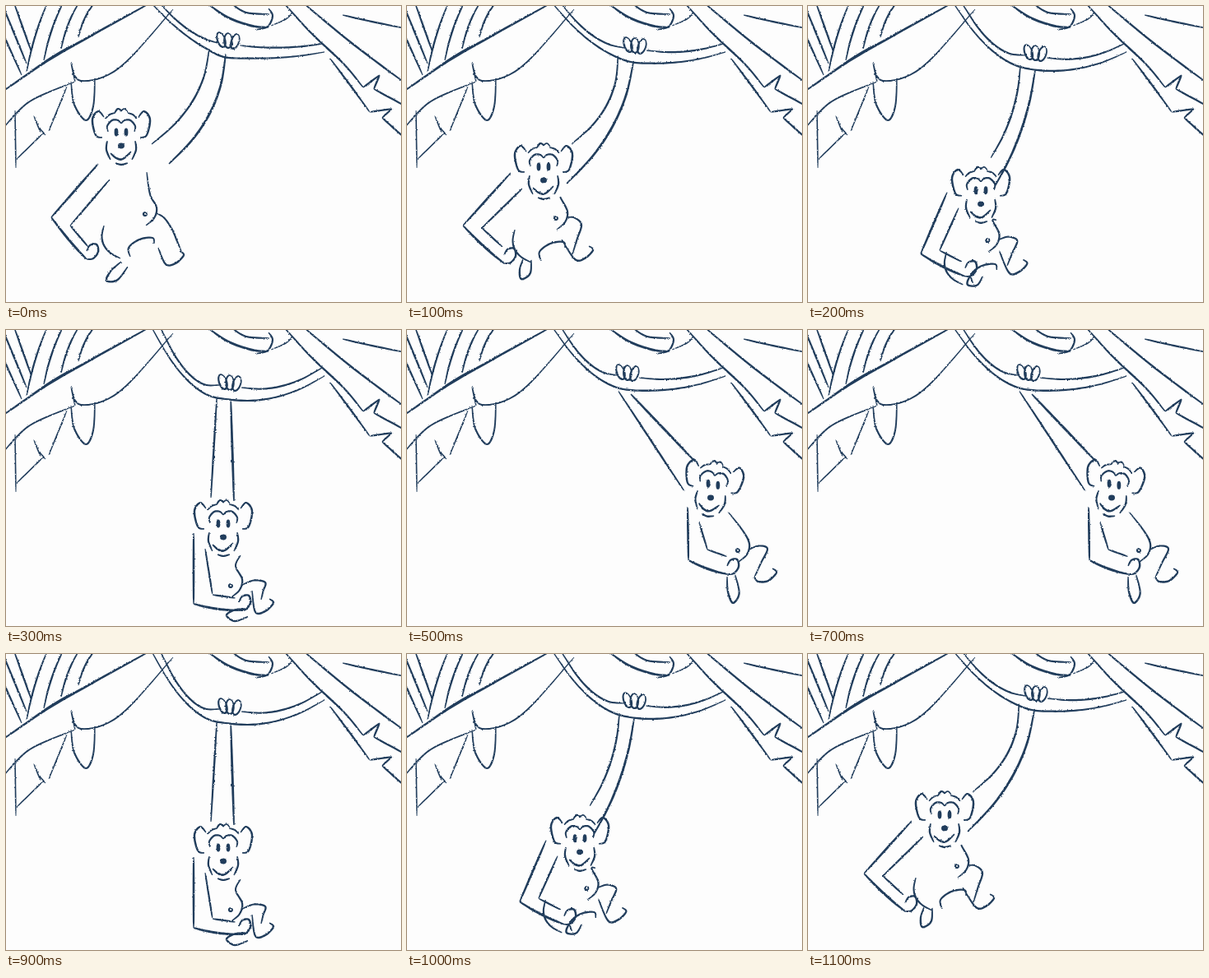
An HTML page that plays this animation: 480x360 px, repeating every 1.2 s.

```html
<!DOCTYPE html>
<html lang="en">
<head>
<meta charset="utf-8">
<title>Swinging monkey</title>
<style>
  html, body { margin: 0; width: 100%; height: 100%; overflow: hidden; background: #fdfdfd; }
  svg { display: block; width: 100vw; height: 100vh; }
</style>
</head>
<body>
<svg viewBox="0 0 480 360" fill="#213d5c">
  <filter id="chalk" filterUnits="userSpaceOnUse" x="0" y="0" width="480" height="360" color-interpolation-filters="sRGB">
    <feTurbulence type="fractalNoise" baseFrequency="0.6" numOctaves="2" seed="4"/>
    <feDisplacementMap in="SourceGraphic" scale="2.2" xChannelSelector="R" yChannelSelector="G"/>
  </filter>
  <g filter="url(#chalk)">
    <path id="jungle"/>
    <path id="monkey"/>
  </g>
</svg>
<script>
const STEP = 100;
const KEYS = [0, 1, 3, 5];
const PHASES = [0, 1, 2, 3, 4, 5, 5.6];   // the swing slows down at its right end

const points = text => text.trim().split(/\s+/).map(p => p.split(',').map(Number));
const add = (p, x, y) => [p[0] + x, p[1] + y];
const mix = (a, b, k) => [a[0] + (b[0] - a[0]) * k, a[1] + (b[1] - a[1]) * k];
const around = (origin, text) => points(text).map(p => add(origin, ...p));

// Points from a to b, bent away from the straight line by (dx, dy) in the middle.
const arc = (a, b, dx, dy) => [0, 0.25, 0.5, 0.75, 1].map(u => {
  const k = 4 * u * (1 - u);
  return add(mix(a, b, u), dx * k, dy * k);
});

// Catmull-Rom curve through the given points.
function spline(pts, n = 8) {
  const out = [];
  for (let i = 0; i < pts.length - 1; i++) {
    const p0 = pts[i - 1] || pts[i], p1 = pts[i], p2 = pts[i + 1], p3 = pts[i + 2] || p2;
    for (let j = 0; j < n; j++) {
      const t = j / n;
      out.push([0, 1].map(c => p1[c] + 0.5 * t * (p2[c] - p0[c] +
        t * (2 * p0[c] - 5 * p1[c] + 4 * p2[c] - p3[c] +
        t * (3 * (p1[c] - p2[c]) + p3[c] - p0[c])))));
    }
  }
  return [...out, pts[pts.length - 1]];
}

// Outline of a brush stroke that thins out at both ends.
function brush(pts, width = 2.3) {
  const line = spline(pts), last = line.length - 1;
  const left = [], right = [];
  line.forEach(([x, y], i) => {
    const a = line[Math.max(0, i - 1)], b = line[Math.min(last, i + 1)];
    const dx = b[0] - a[0], dy = b[1] - a[1], len = Math.hypot(dx, dy) || 1;
    const r = width / 2 * (0.45 + 0.55 * Math.sqrt(Math.abs(Math.sin(Math.PI * i / last))));
    left.push([x - dy / len * r, y + dx / len * r]);
    right.unshift([x + dy / len * r, y - dx / len * r]);
  });
  return 'M' + left.concat(right).map(p => p.map(v => v.toFixed(1)).join(' ')).join('L') + 'Z';
}

// Slash marks a sharp corner: the next curve starts where the last one ended.
function sketch(text, width) {
  let end = [];
  return text.split('/').map(part => {
    const pts = [...end, ...points(part)];
    end = pts.slice(-1);
    return brush(pts, width);
  }).join('');
}

const dot = ([x, y], rx, ry) =>
  `M${x - rx} ${y}a${rx} ${ry} 0 1 0 ${2 * rx} 0a${rx} ${ry} 0 1 0 ${-2 * rx} 0Z`;

function ring([x, y], rx, ry, lean) {
  const pts = [];
  for (let a = -1; a < 5.5; a += Math.PI / 4) {
    const v = ry * Math.sin(a);
    pts.push([x + rx * Math.cos(a) - v * lean, y + v]);
  }
  return brush(pts);
}

function drawJungle() {
  let d = '';
  for (let i = 0; i < 3; i++) d += brush([[15 * i - 20, -3], [19 + 6 * i, 84 - 14 * i]]);
  for (let i = 0; i < 4; i++) d += brush(arc([50 + 19 * i, -3], [25 + 21 * i, 80 - 14 * i], -2, -2));

  // Left leaf with its torn pieces.
  d += sketch('-4,104 50,67 100,38 176,-4', 2.8) + sketch('18,88 60,59 105,35', 1.3);
  d += sketch('-3,148 29,116 84,92 / 79,69 / 91,91 138,75 203,4', 1.9);
  d += sketch('79,92 83,120 97,139 106,122 108,88');
  d += sketch('11,127 12,197', 1.7) + sketch('13,186 45,155', 1.7);
  d += sketch('34,134 42,154', 1.7) + sketch('41,149 48,157', 1.7) + sketch('52,152 74,98', 1.7);

  // Right leaf.
  d += sketch('362,-3 420,45 484,93', 2.5) + sketch('409,11 440,18 484,27');
  d += sketch('338,-3 372,34 410,70 434,99 / 454,84 / 447,101 / 484,121', 2.4);
  d += sketch('394,64 418,96 442,129 / 469,125 / 457,136 / 484,160');

  // Coiled vine.
  d += sketch('246,-2 270,14 298,24 318,26', 2.9) + sketch('275,-2 292,8 320,10');
  return d + sketch('319,3 324,12 318,25 303,29') + sketch('322,24 340,16 348,8', 1.6);
}

// Each joint passes through four places during one swing.
const joints = {
  grip: '270,42 277,48 272,64 268,52',
  nose: '140,170 166,212 264,252 369,204',
  armBack: '177,168 200,168 249,204 337,196',
  armFront: '198,192 194,216 277,208 350,160',
  shoulder: '112,192 126,203 228,247 341,215',
  elbow: '55,257 68,267 228,333 342,280',
  wrist: '98,308 118,313 283,341 389,297',
  chest: '171,202 187,233 285,274 390,221',
  navel: '169,253 181,258 273,311 402,268',
  knee: '202,272 212,266 315,307 438,266',
  ankle: '213,298 201,302 310,328 422,301',
  calf: '185,294 188,284 299,317 422,301',
  toe: '206,313 216,307 315,342 439,305',
  heel: '140,311 141,308 291,339 389,300',
  sole: '122,334 139,332 268,347 396,332'
};
for (const name in joints) joints[name] = points(joints[name]);

// Smooth cubic path through the four places.
function locate(places, t) {
  return KEYS.reduce((sum, key, i) => {
    const weight = KEYS.reduce((w, k) => k === key ? w : w * (t - k) / (key - k), 1);
    return add(sum, places[i][0] * weight, places[i][1] * weight);
  }, [0, 0]);
}

function drawVine(grip) {
  const sag = (grip[1] - 30) / 2, under = add(grip, -5, 20);
  return brush(arc([188, -2], add(grip, -13, 3), 0, 1.3 * sag)) +
    brush(arc(add(grip, 14, 6), [384, 46], 0, 0.6 * sag)) +
    brush([...arc([177, -3], under, 0, 1.3 * sag), ...arc(under, [387, 56], 0, 0.7 * sag).slice(1)]) +
    [-1, 0, 1].map(k => ring(add(grip, 8.5 * k, k), 4.8, 9, 0.25 * k)).join('');
}

function drawHead(nose, tilt) {
  const c = Math.cos(tilt), s = Math.sin(tilt);
  const place = ([x, y]) => add(nose, x * c - y * s, x * s + y * c);
  const stroke = (text, width) => brush(points(text).map(place), width);
  let d = dot(nose, 4, 3.4);
  for (const side of [-1, 1]) {
    const mirror = pts => pts.map(([x, y]) => place([x * side, y]));
    d += brush(mirror(points('21,-35 28,-42 35,-32 31,-13 23,-10')), 2.5);
    d += brush(mirror(points('0,-27 4,-31 11,-31 17,-24 16,-17')));
    d += brush(mirror(points('7,-40 14,-38 19,-33')), 2);
    d += brush(mirror(points('17,-6 18,5 13,17')));
    d += dot(place([6 * side, -16.5]), 2.4, 5);
  }
  return d + stroke('-8,-40 -4,-45 1,-42') + stroke('-1,-42 4,-45 8,-41', 1.7) +
    stroke('-13,9 -6,15 2,16 12,7', 2.6) + stroke('-7,21 0,23 8,21');
}

function drawPose(t) {
  const j = {};
  for (const name in joints) j[name] = locate(joints[name], t);
  const { grip, shoulder, elbow, wrist, navel, knee, ankle, toe, heel, sole } = j;

  // Holding arm, curved while the body hangs back.
  const bow = 15 * Math.min(1, Math.max(0, (3 - t) / 2));
  let d = drawVine(grip) + drawHead(j.nose, Math.max(0, t - 3) * 0.09);
  d += brush(arc(add(grip, 2.4 * t - 23, 10 + 2.5 * t), j.armBack, bow, bow * 0.35), 2.4);
  d += brush(arc(add(grip, 1.4 * t - 3, 17 + 1.8 * t), j.armFront, bow, bow * 0.35), 2.9);

  // Free arm.
  const crook = add(elbow, 23, Math.max(-13, 10 - 7 * t));
  d += brush([shoulder, elbow], 2.7) + brush(arc(elbow, wrist, 0, 2), 3);
  d += brush([add(shoulder, 14, 19), crook]);
  d += brush([crook, add(crook, (wrist[0] - elbow[0]) / 2, (wrist[1] - elbow[1]) / 2)]);
  d += brush(around(wrist, '0,0 8,-1 14,-9 12,-18 4,-17 0,-10'), 2.5);

  // Belly; its far side shows only while the arm swings clear of it.
  d += brush([j.chest, ...around(navel, '6,-24 14,-8 11,5 1,14')]) + ring(navel, 2, 2, 0);
  if (t < 3) {
    d += brush(arc(add(navel, -50, 14), add(navel, -30, 54), -10, 4));
    d += brush(around(navel, '-18,52 -20,41 -7,31 9,29 11,36'));
  }

  // Legs.
  const hip = add(navel, 14, -1);
  d += brush([hip, add(mix(hip, knee, 0.5), 0, -4), knee, mix(knee, ankle, 0.5), ankle]);
  d += brush([j.calf, ...around(toe, '-12,1 0,0 10,-10 5,-15')], 2.5);
  const dx = sole[0] - heel[0], dy = sole[1] - heel[1], len = Math.hypot(dx, dy);
  const beside = (p, w) => add(p, dy / len * w, -dx / len * w);
  return d + brush([heel, beside(mix(heel, sole, 0.55), -3), sole,
    beside(mix(heel, sole, 0.7), 10), beside(heel, 10)], 2.5);
}

const drawings = PHASES.map(drawPose);
const jungle = document.getElementById('jungle');
const monkey = document.getElementById('monkey');
jungle.setAttribute('d', drawJungle());

const cycle = 2 * (PHASES.length - 1);
let shown = -1;

function render(ms) {
  const step = Math.floor(ms / STEP) % cycle;
  const index = Math.min(step, cycle - step);
  if (index !== shown) monkey.setAttribute('d', drawings[shown = index]);
}

const start = performance.now();
function tick() {
  render(performance.now() - start);
  requestAnimationFrame(tick);
}
tick();
</script>
</body>
</html>
```
